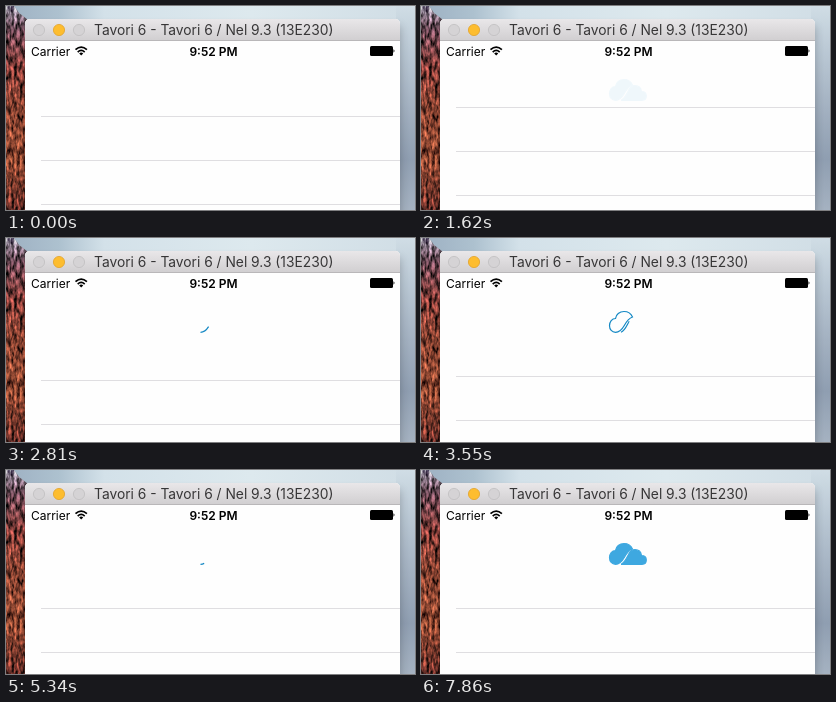
An HTML page for the animation above (8000 ms loop, 409 px wide and 204 px high).

```html
<!DOCTYPE html>
<html lang="en">
<head>
<meta charset="utf-8">
<title>Pull to refresh</title>
<style>
  html, body { margin: 0; width: 100%; height: 100%; overflow: hidden; }
  svg { display: block; width: 100%; height: 100%; font-family: Inter, Roboto, sans-serif; }
</style>
</head>
<body>
<svg viewBox="0 0 409 204">
  <defs>
    <linearGradient id="sky">
      <stop offset="0" stop-color="#9db0c2"/>
      <stop offset=".13" stop-color="#adc1cf"/>
      <stop offset=".24" stop-color="#d3e1e9"/>
      <stop offset=".6" stop-color="#dde9ee"/>
      <stop offset="1" stop-color="#d0dde5"/>
    </linearGradient>
    <linearGradient id="cliff" x2="0" y2="1">
      <stop offset="0" stop-color="#8d8798"/>
      <stop offset=".12" stop-color="#66434f"/>
      <stop offset=".3" stop-color="#7d3a35"/>
      <stop offset=".5" stop-color="#83402f"/>
      <stop offset=".75" stop-color="#8a452f"/>
      <stop offset="1" stop-color="#6b3029"/>
    </linearGradient>
    <linearGradient id="haze" x2="0" y2="1">
      <stop offset="0" stop-color="#d0dde5"/>
      <stop offset=".2" stop-color="#bccad6"/>
      <stop offset=".5" stop-color="#a3b1c1"/>
      <stop offset=".75" stop-color="#8f9eb1"/>
      <stop offset="1" stop-color="#a5b2c1"/>
    </linearGradient>
    <linearGradient id="bar" x2="0" y2="1">
      <stop offset="0" stop-color="#e9e7e9"/>
      <stop offset="1" stop-color="#d0ced0"/>
    </linearGradient>
    <filter id="shadow" x="-10%" y="-10%" width="120%" height="120%">
      <feGaussianBlur stdDeviation="5"/>
    </filter>
    <filter id="rock" x="0" y="0" width="100%" height="100%" color-interpolation-filters="sRGB">
      <feTurbulence type="fractalNoise" baseFrequency=".35 .12" numOctaves="3" seed="4"/>
      <feColorMatrix values="1.6 0 0 0 -.3  1.6 0 0 0 -.3  1.6 0 0 0 -.3  0 0 0 0 1"/>
      <feComposite in2="SourceGraphic" operator="in"/>
      <feBlend in2="SourceGraphic" mode="overlay"/>
    </filter>
  </defs>

  <rect width="409" height="204" fill="url(#sky)"/>
  <rect x="390" width="19" height="204" fill="url(#haze)"/>
  <path d="M0 0H8L13 7L22 14V204H0Z" fill="url(#cliff)" filter="url(#rock)"/>
  <rect x="19" y="20" width="375" height="200" opacity=".25" filter="url(#shadow)"/>

  <path d="M19 204V18Q19 13 24 13H389Q394 13 394 18V204Z" fill="#fefefe"/>
  <path d="M19 35V18Q19 13 24 13H389Q394 13 394 18V35Z" fill="url(#bar)"/>
  <path d="M19 34.5H394" stroke="#b9b7b9"/>
  <g stroke-width=".8">
    <circle cx="33" cy="24" r="5.6" fill="#d5d3d5" stroke="#c1bfc1"/>
    <circle cx="53" cy="24" r="5.6" fill="#fdbd2f" stroke="#e2a32a"/>
    <circle cx="73" cy="24" r="5.6" fill="#d5d3d5" stroke="#c1bfc1"/>
  </g>
  <text x="88" y="29" font-size="13.8" fill="#373637">Tavori 6 - Tavori 6 / Nel 9.3 (13E230)</text>

  <text x="25" y="49.5" font-size="12">Carrier</text>
  <text x="207.5" y="49.5" font-size="12" font-weight="600" text-anchor="middle">9:52 PM</text>
  <g fill="none" stroke="#000" stroke-width="1.7">
    <path d="M69.5 43.7Q75.2 38.4 80.9 43.7M71.7 46.1Q75.2 42.8 78.7 46.1"/>
    <path d="M73.2 47.4Q75.2 45.8 77.2 47.4L75.2 49.6Z" fill="#000" stroke="none"/>
  </g>
  <rect x="364" y="40" width="23" height="10" rx="1.5"/>
  <path d="M387.5 43.3Q389.5 45 387.5 46.7Z"/>

  <path id="rows" d="M35 78.5H394M35 122.5H394M35 166.5H394" stroke="#dfdee1"/>

  <g id="cloud" stroke-width="1.2">
    <path pathLength="1" d="M194.5 94.3C198.8 94.3 201.3 91 203.3 87.5C205.5 83.5 207.5 80.5 211.5 79C210 75.5 207 73.5 203 73.5C198.5 73.5 195 76.5 194.5 80.5C191 80.5 188.5 84 188.5 87.8C188.5 91.5 191 94.3 194.5 94.3Z"/>
    <path pathLength="1" d="M200 94.3C204 92.5 205.5 88 207.5 84.5C208.8 81.5 211.5 79.7 214 79.7C217.5 79.7 220 82 220.5 85.5C223.5 85.5 225.3 87.5 225.3 90C225.3 92.8 223.5 94.3 221 94.3Z"/>
  </g>
</svg>
<script>
  const LOOP = 8000, REFRESH_START = 2700, CYCLE = 2600, DRAW = 1350;
  const LINE_RGB = [20, 136, 196], FILL_RGB = [62, 168, 224];

  // [time in ms, value]
  const pullKeys = [
    [0, 32], [150, 33], [440, 30], [590, 13], [730, 4], [880, 1], [1030, 0],
    [1500, 0], [1620, 23], [1770, 14], [1920, 4], [2060, 0],
    [2400, 0], [2510, 22], [2660, 56], [2760, 66], [2810, 64], [2960, 61], [3110, 60]
  ];
  const alphaKeys = [
    [0, 0], [150, 0.02], [440, 0.1], [730, 0.05], [1030, 0],
    [1500, 0], [1620, 0.07], [1770, 0.06], [1920, 0.03], [2060, 0],
    [2400, 0], [2510, 0.08], [2660, 0.2], [REFRESH_START, 0]
  ];

  const rows = document.getElementById('rows');
  const cloud = document.getElementById('cloud');
  const [left, right] = cloud.children;
  const clamp = v => Math.min(1, Math.max(0, v));

  function sample(keys, t) {
    const i = keys.findIndex(key => key[0] > t);
    if (i < 0) return keys[keys.length - 1][1];
    const [t0, v0] = keys[i - 1], [t1, v1] = keys[i];
    return v0 + (v1 - v0) * (t - t0) / (t1 - t0);
  }

  function drawCloud(opacity, stroke, fill, blend) {
    const rgb = LINE_RGB.map((c, i) => Math.round(c + (FILL_RGB[i] - c) * blend));
    cloud.setAttribute('opacity', opacity);
    cloud.setAttribute('stroke', `rgb(${rgb})`);
    cloud.setAttribute('fill', `rgb(${FILL_RGB})`);
    cloud.setAttribute('fill-opacity', fill);
    left.setAttribute('stroke-dasharray', `${clamp(stroke / 0.53)} 2`);
    right.setAttribute('stroke-dasharray', `${clamp((stroke - 0.53) / 0.47)} 2`);
  }

  function render(t) {
    rows.setAttribute('transform', `translate(0 ${Math.round(sample(pullKeys, t))})`);
    if (t < REFRESH_START) {
      drawCloud(sample(alphaKeys, t), 1, 1, 1);
    } else {
      const phase = (t - REFRESH_START) % CYCLE;
      const fill = 1 - (1 - clamp((phase - 1400) / 700)) ** 4;
      drawCloud(1, clamp(phase / DRAW), fill, clamp((phase - 1600) / 800));
    }
  }

  const start = performance.now();
  function tick() {
    render((performance.now() - start) % LOOP);
    requestAnimationFrame(tick);
  }
  tick();
</script>
</body>
</html>
```
